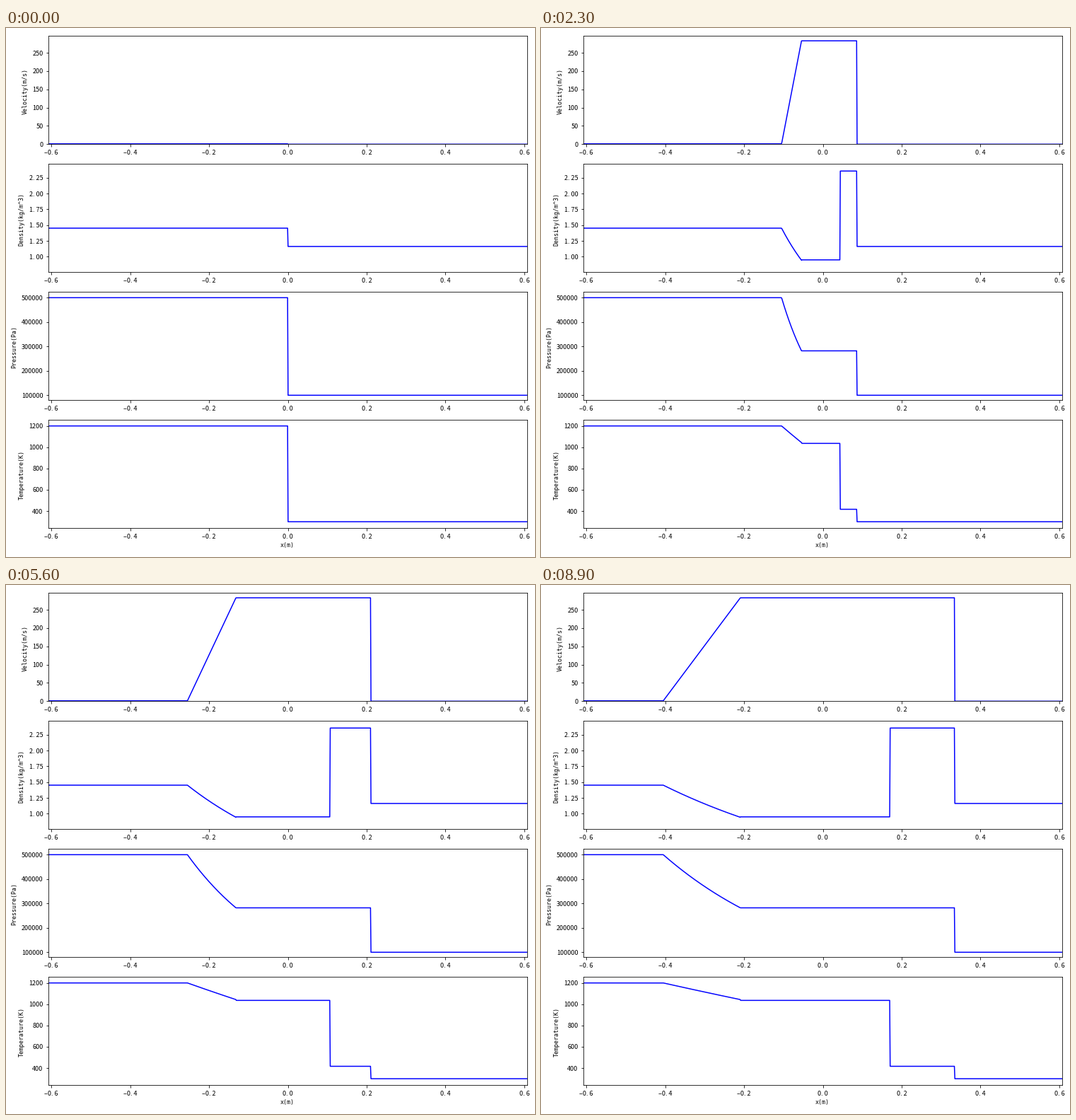
A matplotlib script that plays this animation: 748x748 px, repeating every 9 s.

```python
import numpy as np
import matplotlib.pyplot as plt
from matplotlib.animation import FuncAnimation
from matplotlib.ticker import FuncFormatter

SIZE, DPI = 748, 72
FRAMES, INTERVAL = 90, 100

# Gas states on both sides of the diaphragm
R, GAMMA = 287.0, 1.323
P_L, T_L, U_L = 500e3, 1200.0, 1.0
P_R, T_R = 100e3, 300.0
P_MID, U_MID = 282.1e3, 283.0
T_MID_L, RHO_MID_R = 1036.0, 2.358
RHO_MIN = 0.942
C_L = np.sqrt(GAMMA * R * T_L)

# Wave positions at the end of the run, in metres
HEAD, TAIL, CONTACT, SHOCK = -0.4048, -0.2092, 0.1698, 0.334
X_MAX = 0.6072
x = np.linspace(-X_MAX, X_MAX, 1000)


def density(p, t):
    return p / (R * t)


def shock_tube(s):
    """Velocity, density, pressure and temperature at run fraction s."""
    zones = [x < w * s for w in (HEAD, TAIL, CONTACT, SHOCK)]
    frac = np.clip((x - HEAD * s) / ((TAIL - HEAD) * max(s, 1e-9)), 0, 1)
    u = U_L + (U_MID - U_L) * frac
    c = 1 - (GAMMA - 1) / 2 * (u - U_L) / C_L
    p = P_L * c ** (2 * GAMMA / (GAMMA - 1))
    t = T_L * c ** 2
    t_mid_r = P_MID / (R * RHO_MID_R)
    rows = (
        (U_L, u, U_MID, U_MID, 0.0),
        (density(P_L, T_L), density(p, t), density(P_MID, T_MID_L),
         RHO_MID_R, density(P_R, T_R)),
        (P_L, p, P_MID, P_MID, P_R),
        (T_L, t, T_MID_L, t_mid_r, T_R),
    )
    return [np.select(zones, row[:4], row[4]) for row in rows]


def ticks(digits):
    # wide decimal point, as in a half-width font
    def fmt(v, _):
        text = f"{v + 0.0:.{digits}f}"
        return text.replace("-", "\u2013").replace(".", ". ")
    return FuncFormatter(fmt)


plt.rcParams["font.family"] = ["Noto Sans CJK JP", "DejaVu Sans"]
fig = plt.figure(figsize=(SIZE / DPI, SIZE / DPI), dpi=DPI, facecolor="white")


def label(px, py, text, rotation=0):
    fig.text(px / SIZE, 1 - py / SIZE, text, rotation=rotation, fontsize=8.4,
             family="DejaVu Sans Mono", ha="center", va="center")


# label, label x, y limits, y ticks, decimals
PANELS = [
    ("Velocity(m/s)", 27, (0, 1.05 * U_MID), np.arange(0, 251, 50), 0),
    ("Density(kg/m^3)", 22, (0.8 * RHO_MIN, 1.05 * RHO_MID_R),
     np.arange(1, 2.3, 0.25), 2),
    ("Pressure(Pa)", 12, (0.8 * P_R, 1.05 * P_L),
     np.arange(100e3, 501e3, 100e3), 0),
    ("Temperature(K)", 22, (0.8 * T_R, 1.05 * T_L),
     np.arange(400, 1201, 200), 0),
]
LEFT, WIDTH, TOP, HEIGHT, PITCH = 60, 677, 10.8, 153.5, 180.95

lines = []
for i, (name, label_x, ylim, yticks, digits) in enumerate(PANELS):
    top = TOP + i * PITCH
    ax = fig.add_axes([LEFT / SIZE, 1 - (top + HEIGHT) / SIZE,
                       WIDTH / SIZE, HEIGHT / SIZE])
    ax.set(xlim=(-X_MAX, X_MAX), ylim=ylim)
    ax.set_xticks(np.arange(-3, 4) / 5)
    ax.set_yticks(yticks)
    ax.xaxis.set_major_formatter(ticks(1))
    ax.yaxis.set_major_formatter(ticks(digits))
    ax.tick_params(labelsize=9, pad=4)
    label(label_x, top + HEIGHT / 2 + 1.5, name, 90)
    lines += ax.plot(x, np.zeros_like(x), color="blue", lw=1.5)
label(397.5, 731.5, "x(m)")


def update(k):
    for line, y in zip(lines, shock_tube(k / (FRAMES - 1))):
        line.set_ydata(y)
    return lines


anim = FuncAnimation(fig, update, frames=FRAMES, interval=INTERVAL,
                     repeat=True, repeat_delay=0)
plt.show()
```
